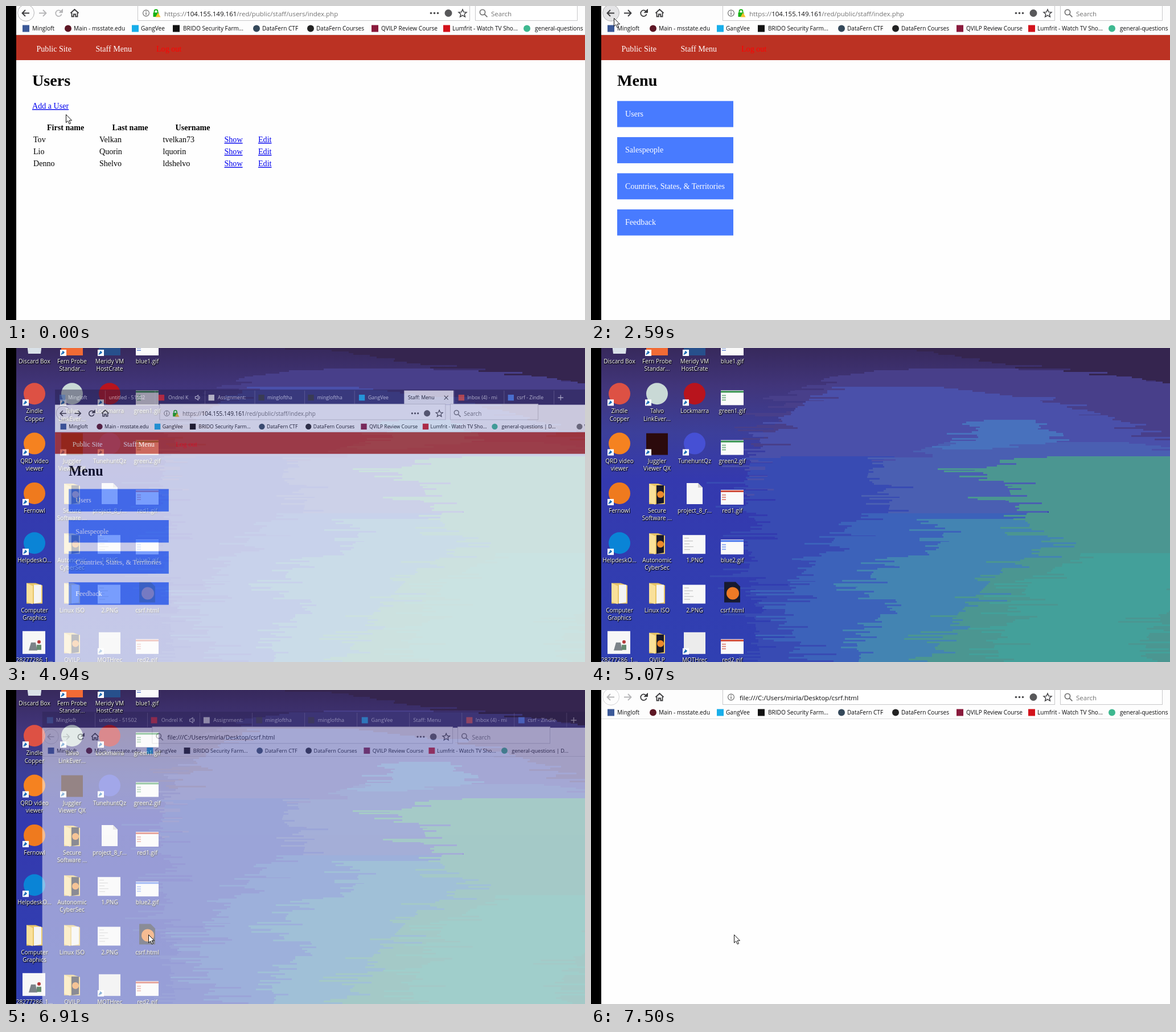
An HTML page that plays this animation: 1017x551 px, repeating every 8 s.

```html
<!DOCTYPE html>
<html lang="en">
<head>
<meta charset="utf-8">
<title>Desktop session</title>
<style>
  html, body { margin: 0; width: 100%; height: 100%; overflow: hidden; background: #000; }
  svg { display: block; width: 1017px; height: 551px; }
  text { white-space: pre; }
  .ui { font: 10.1px "Open Sans", "Noto Sans", sans-serif; }
  .field { font: 11.5px "Open Sans", "Noto Sans", sans-serif; }
  .page { font: 14.08px "Liberation Serif", "Times New Roman", serif; }
  .title { font: bold 28.16px "Liberation Serif", "Times New Roman", serif; }
  .bold { font-weight: bold; }
  .link { fill: #00e; text-decoration: underline; }
  .label { fill: #fff; text-anchor: middle; text-shadow: 0 1px 2px #000, 1px 1px 1px #000; }
  .line { fill: none; stroke: #3c3c3e; stroke-width: 1.8; }
</style>
</head>
<body>
<svg id="stage" viewBox="0 0 1017 551"></svg>
<script>
const LOOP = 8000;
const range = n => [...Array(n).keys()];
const rect = (x, y, w, h, fill, more = '') =>
  `<rect x="${x}" y="${y}" width="${w}" height="${h}" fill="${fill}" ${more}/>`;
const circle = (x, y, r, fill, more = '') =>
  `<circle cx="${x}" cy="${y}" r="${r}" fill="${fill}" ${more}/>`;
const shape = (d, fill, more = '') => `<path d="${d}" fill="${fill}" ${more}/>`;
const line = (d, more = '') => `<path class="line" d="${d}" ${more}/>`;
const text = (x, y, str, cls, fill = '#0c0c0d') =>
  `<text x="${x}" y="${y}" class="${cls}" fill="${fill}">${str}</text>`;
const group = (id, body) => `<g id="${id}">${body}</g>`;

// ---------- wallpaper ----------
let seed = 7;
const random = () => (seed = (seed * 16807) % 2147483647) / 2147483647;

// Streaky patch; rows are [y, left, right], joined linearly with jagged ends.
function streaks(fill, rows, jag = 70) {
  let d = '';
  const jitter = () => (random() * 2 - 1) ** 3 * jag;
  for (let i = 0; i + 1 < rows.length; i++) {
    const [y0, l0, r0] = rows[i], [y1, l1, r1] = rows[i + 1];
    for (let y = y0; y < y1; y += 3) {
      const k = (y - y0) / (y1 - y0);
      const left = Math.round(l0 + (l1 - l0) * k + jitter());
      const right = Math.round(r0 + (r1 - r0) * k + jitter());
      if (right > left) d += `M${left} ${y}H${right}v3H${left}z`;
    }
  }
  return shape(d, fill);
}

const wallpaper = () => `
  <linearGradient id="sky" x2="0" y2="1">
    <stop offset="0" stop-color="#37295c"/><stop offset=".12" stop-color="#41357a"/>
    <stop offset=".27" stop-color="#3c3f9a"/><stop offset=".42" stop-color="#3439ae"/>
    <stop offset="1" stop-color="#3040b2"/>
  </linearGradient>` +
  rect(0, 0, 1017, 551, 'url(#sky)') +
  streaks('#35254f', [[0, 560, 1100], [24, 700, 1100], [48, 900, 1100], [70, 1010, 1100]]) +
  streaks('#483f8a', [[36, 520, 800], [50, 420, 950], [75, 350, 1100], [140, 320, 1100], [190, 310, 1100]]) +
  streaks('#4a50aa', [[68, 430, 620], [90, 380, 800], [115, 345, 900], [150, 315, 990], [200, 280, 1100], [260, 270, 1100]], 50) +
  streaks('#384bb3', [[190, 280, 520], [250, 270, 600], [330, 275, 700], [430, 280, 650], [551, 300, 600]]) +
  streaks('#4a5fb2', [[165, 620, 960], [195, 510, 1100], [225, 480, 1100], [260, 530, 900], [292, 520, 760]]) +
  streaks('#4871bd', [[126, 690, 780], [140, 680, 800], [160, 640, 840], [176, 610, 720]], 40) +
  streaks('#3c62ba', [[290, 480, 1100], [330, 430, 1100], [370, 400, 1100], [410, 350, 1100], [470, 340, 1100], [551, 380, 1100]]) +
  streaks('#4384b2', [[300, 590, 1100], [340, 630, 1100], [380, 510, 1100], [420, 465, 1100], [455, 530, 1100], [500, 465, 1100], [551, 470, 1100]], 50) +
  streaks('#4b9691', [[190, 770, 1100], [212, 675, 1100], [240, 740, 1100], [265, 730, 1100], [290, 760, 1100], [350, 790, 1100], [400, 710, 1100], [470, 640, 1100], [551, 590, 1100]]) +
  streaks('#43a09a', [[360, 860, 1100], [410, 770, 1100], [470, 740, 1000], [551, 690, 960]]);

// ---------- desktop ----------
const colX = [50, 116, 182, 248];
const badge = (x, y) => rect(x - 21, y + 10, 11, 11, '#fff') +
  line(`M${x - 18.5} ${y + 19}q0-4 4-4.5m-2.5-2l3 2.2l-2.5 2.8`, 'style="stroke:#1769b5;stroke-width:1.6"');
const paper = (x, y) => shape(`M${x - 14} ${y - 18}h20l8 8v29h-28z`, '#f6f6f6') +
  shape(`M${x + 6} ${y - 18}v8h8z`, '#cfcfcf');

const icons = {
  dot: (x, y, fill) => circle(x, y, 19, fill),
  box: (x, y, fill) => rect(x - 19, y - 18, 38, 38, fill),
  bin: (x, y) => shape(`M${x - 15} ${y - 16}h30l-4 33h-22z`, '#d9e1e8'),
  folder: (x, y, fill) => shape(`M${x - 14} ${y - 17}h16l12 4v32h-28z`, '#e8c566') +
    shape(`M${x - 1} ${y - 14}h13v31l-13 2z`, fill) +
    (fill === '#17182a' ? circle(x + 6, y + 2, 6, '#ee8a2c') : '') +
    shape(`M${x - 14} ${y - 17}l11 5v32l-11-4z`, '#f9e09a'),
  page: paper,
  shot: (x, y) => rect(x - 21, y - 14, 40, 33, '#f8f8f8') +
    range(5).map(i => rect(x - 18, y - 9 + i * 5, 8 + i * 7 % 13, 1, '#bbb')).join(''),
  thumb: (x, y, fill) => rect(x - 20, y - 6, 40, 26, '#fafafa') +
    rect(x - 20, y - 5, 40, 3, fill) +
    range(3).map(i => rect(x - 18, y + 2 + i * 4, 7, 2, fill, 'opacity=".6"')).join(''),
  html: (x, y) => shape(`M${x - 14} ${y - 19}h20l8 8v28h-28z`, '#171a30') + circle(x + 1, y + 1, 11, '#ee7a26'),
  photo: (x, y) => rect(x - 21, y - 20, 40, 40, '#f7f7f7') +
    shape(`M${x - 10} ${y + 14}l4-14h8l3 14z`, '#7c8389') +
    circle(x + 8, y - 1, 3, '#b53a3a') + rect(x + 4, y + 4, 8, 9, '#658a70'),
};

// [kind, colour, shortcut, label, second line], row by row
const items = [
  ['bin', '', 0, 'Discard Box'], ['box', '#f26b35', 1, 'Fern Probe', 'Standar...'],
  ['box', '#27508c', 1, 'Meridy VM', 'HostCrate'], ['thumb', '#3c67c8', 0, 'blue1.gif'],
  ['dot', '#dd5144', 1, 'Zindle', 'Copper'], ['dot', '#c9d9d6', 1, 'Talvo', 'LinkEver...'],
  ['dot', '#b8141d', 1, 'Lockmarra'], ['thumb', '#35924e', 0, 'green1.gif'],
  ['dot', '#f58220', 1, 'QRD video', 'viewer'], ['box', '#2b0a0c', 1, 'Juggler', 'Viewer QX'],
  ['dot', '#4650d4', 1, 'TunehuntQz'], ['thumb', '#35924e', 0, 'green2.gif'],
  ['dot', '#ef7a1e', 1, 'Fernowl'], ['folder', '#17182a', 0, 'Secure', 'Software ...'],
  ['page', '', 0, 'project_8_r...'], ['thumb', '#cf4a38', 0, 'red1.gif'],
  ['dot', '#0a84d6', 1, 'HelpdeskO...'], ['folder', '#17182a', 0, 'Autonomic', 'CyberSec'],
  ['shot', '', 0, '1.PNG'], ['thumb', '#4a78ee', 0, 'blue2.gif'],
  ['folder', '#f4f4f4', 0, 'Computer', 'Graphics'], ['folder', '#f4f4f4', 0, 'Linux ISO'],
  ['shot', '', 0, '2.PNG'], ['html', '', 0, 'csrf.html'],
  ['photo', '', 0, '28277286_1...'], ['folder', '#17182a', 0, 'QVILP'],
  ['box', '#ececec', 1, 'MOTHrec'], ['thumb', '#cf4a38', 0, 'red2.gif'],
];

const desktop = () => wallpaper() +
  rect(217.5, 407.5, 62, 59, '#7fb5ff', 'id="hover" fill-opacity=".35" stroke="#8fc0f0" stroke-opacity=".7"') +
  items.map(([kind, fill, shortcut, label, second], i) => {
    const x = colX[i % 4], y = -7 + 87.3 * Math.floor(i / 4);
    return icons[kind](x, y, fill) + (shortcut ? badge(x, y) : '') +
      text(x, y + 34, label, 'ui label', '#fff') +
      (second ? text(x, y + 47.2, second, 'ui label', '#fff') : '');
  }).join('');

// ---------- browser ----------
// [icon centre, text x, label, icon colour, square icon]
const bookmarks = [
  [35, 46, 'Mingloft', '#3b5998', 1], [109, 119, 'Main - msstate.edu', '#5d1725', 0],
  [227, 237, 'GangVee', '#18aeea', 1], [299, 311, 'BRIDO Security Farm...', '#111', 1],
  [440, 450, 'DataFern CTF', '#34485a', 0], [535, 545, 'DataFern Courses', '#222', 0],
  [648, 659, 'QVILP Review Course', '#8a1a3c', 1], [774, 784, 'Lumfrit - Watch TV Sho...', '#d3121b', 1],
  [915, 929, 'general-questions | D...', '#3eb890', 0], [1088, 1098, 'Week 8', '#777', 0],
];
const tabs = [
  [33, 44.6, 'Mingloft', '#3b5998'], [0, 128, 'untitled - 51502'],
  [235, 249, 'Ondrel K', '#d8252b'], [337, 350, 'Assignment:', '#ddd'],
  [439, 451, 'mingloftha', '#333'], [540, 553, 'mingloftha', '#333'],
  [644, 656.6, 'GangVee', '#18aeea'], [0, 738, 'Staff: Menu'],
  [847, 859, 'Inbox (4) - mi', '#d64a3d'], [948, 960, 'csrf - Zindle', '#4a80e8'],
];
const mark = (x, y, fill, square) => square ? rect(x - 6, y - 6, 12, 12, fill) : circle(x, y, 6, fill);
const magnifier = x => `<circle class="line" cx="${x}" cy="11" r="4.6" style="stroke:#777"/>` +
  line(`M${x + 3.4} 14.4l5 5`, 'style="stroke:#777"');
const arrow = (x, dir) => `M${x + dir * 6} 12.5H${x - dir * 6}M${x + dir} 7l${dir * 5.5} 5.5l${-dir * 5.5} 5.5`;

const tabStrip = () =>
  rect(18, -36, 1200, 31, '#241d45', 'fill-opacity=".6"') +
  rect(730, -34, 101, 29, '#f4f4f6', 'id="activeTab"') +
  range(10).map(i => rect(120 + 101.7 * i, -34, 1, 28, '#8a84a8', 'opacity=".6"')).join('') +
  tabs.map(([ix, tx, label, fill]) => (fill ? mark(ix, -19.5, fill, 1) : '') +
    `<text x="${tx}" y="-16" class="ui" ${tx === 738 ? 'id="activeLabel"' : ''} fill="#dcdce8">${label}</text>`).join('') +
  line('M304-21.5h2l4-3v10l-4-3h-2zM312-22.5q2 3 0 6', 'style="stroke:#dcdce8;stroke-width:1.2"') +
  line('M812-23.5l8 8m0-8l-8 8', 'id="closeTab" style="stroke-width:1.2"') +
  line('M1044-19.5h11m-5.5-5.5v11', 'style="stroke:#dcdce8;stroke-width:1.3"');

const webUrl = (id, tail) => `<text id="${id}" x="278" y="17.5" class="field" fill="#737373">https://` +
  `<tspan fill="#0c0c0d">104.155.149.161</tspan>/red/public/staff/${tail}</text>`;

const toolbar = () =>
  rect(18, -5, 1200, 56, '#fdfdfd') + rect(18, 50, 1200, 1, '#dedede') +
  circle(35, 12, 14.5, '#fdfdfd', 'id="back" stroke="#b4b4b6"') +
  line(arrow(35, -1), 'id="backArrow"') + line(arrow(64, 1), 'id="forward"') +
  group('reload', line('M97.2 10.2a5.3 5.3 0 1 0 .4 4.2', 'style="stroke:inherit"') +
    shape('M99.5 5.5v6.2h-6.2z', 'currentColor')) +
  line('M113.5 12.5l7-6.5l7 6.5M115.5 12v6.5h3.3v-4h3.4v4h3.3v-6.5') +
  rect(231.5, -6.5, 583, 32, '#fff', 'stroke="#c8c8ca"') +
  rect(824.5, -6.5, 179, 32, '#fff', 'stroke="#c8c8ca"') +
  group('info', '<circle class="line" cx="246" cy="12.5" r="5.4" style="stroke:#666;stroke-width:1.1"/>' +
    rect(245.3, 11.5, 1.4, 4.2, '#666') + rect(245.3, 8.8, 1.4, 1.5, '#666')) +
  group('lookup', magnifier(244)) +
  group('lock', line('M260.5 12v-2.5a3 3 0 0 1 6 0v2.5', 'style="stroke:#14b114"') +
    rect(258.5, 11.5, 10, 7.5, '#14b114') + shape('M267 11.5l4.5 8h-9z', '#f2c02c')) +
  webUrl('usersUrl', 'users/index.php') + webUrl('menuUrl', 'index.php') +
  group('fileUrl', text(261, 17.5, 'file:///C:/Users/mirla/Desktop/csrf.html', 'field')) +
  [747, 753, 759].map(x => circle(x - .5, 12.5, 1.8, '#4a4a4c')).join('') +
  circle(777, 12.5, 6.5, '#58585a') +
  line('M802 6l2 4.6l5 .4l-3.8 3.2l1.2 4.8l-4.4-2.6l-4.4 2.6l1.2-4.8l-3.8-3.2l5-.4z', 'style="stroke-width:1.4"') +
  magnifier(837) + text(852, 17.5, 'Search', 'field', '#737373') +
  bookmarks.map(([ix, tx, label, fill, square]) => mark(ix, 39.5, fill, square) + text(tx, 43, label, 'ui')).join('');

const accounts = [
  ['Tov', 'Velkan', 'tvelkan73'], ['Lio', 'Quorin', 'lquorin'], ['Denno', 'Shelvo', 'ldshelvo'],
];
const usersPage = () => text(46, 140, 'Users', 'title', '#000') +
  text(46, 180, 'Add a User', 'page link') +
  text(72, 218, 'First name', 'page bold', '#000') +
  text(186.5, 218, 'Last name', 'page bold', '#000') +
  text(297.5, 218, 'Username', 'page bold', '#000') +
  accounts.map((account, i) => {
    const y = 239 + 21.2 * i;
    return account.map((value, j) => text([48, 164, 275.5][j], y, value, 'page', '#000')).join('') +
      text(383.5, y, 'Show', 'page link') + text(443, y, 'Edit', 'page link');
  }).join('');

const menuPage = () => text(46, 140, 'Menu', 'title', '#000') +
  ['Users', 'Salespeople', 'Countries, States, &amp; Territories', 'Feedback'].map((label, i) =>
    rect(46, 166.7 + 63.4 * i, 204, 45.8, '#487bff') + text(60, 194 + 63.4 * i, label, 'page', '#fff')).join('');

const navBar = () => rect(18, 51, 1200, 44, '#bb3223') +
  text(53.5, 80, 'Public Site', 'page', '#fff') +
  text(157.5, 80, 'Staff Menu', 'page', '#fff') +
  text(264, 80, 'Log out', 'page', '#f00');

const stage = document.getElementById('stage');
stage.innerHTML = desktop() +
  group('browser', tabStrip() + rect(18, 51, 1200, 700, '#fefefe') + toolbar() +
    group('nav', navBar()) + group('users', usersPage()) + group('menu', menuPage())) +
  rect(0, 0, 18, 551, '#000') +
  shape('M.5.5v14.2l3.3-3.1l2.4 5.4l2.3-1l-2.4-5.2h4.4z', '#fff', 'id="cursor" stroke="#111" stroke-width="1"');

// ---------- timeline ----------
// [from ms, x, y]; without a position the pointer is hidden
const pointer = [
  [0, 105, 190], [270, 115, 193], [430, 154, 196], [570, 156, 196], [990, 139, 178],
  [1130, 88, 134], [1260, 50, 97], [1400, 45, 68], [1520, 43, 54], [1640, 41, 34],
  [1760, 40, 24], [1880, 39, 21], [2030, 40, 21], [2730, 44, 21], [2850, 42, 21],
  [3000, 83, 56], [3150, 150, 160], [3270, 270, 350], [3400, 357, 490], [3550, 381, 525],
  [3690], [5210, 327, 491], [5490, 315, 480], [5620, 302, 467], [5770, 261, 446],
  [5930, 250, 430], [6070, 250, 429], [7060], [7500, 251, 429],
];
// [from ms, opacity, scale, x, y]
const windowPoses = [
  [0, 1, 1, 0, 0], [4940, .72, .861, 70.6, 103.9], [5070, 0, 1, 0, 0],
  [6910, .5, .905, 47.4, 70.7], [7060, 1, 1, 0, 0],
];

const el = id => document.getElementById(id);
const show = (id, on) => el(id).setAttribute('display', on ? 'inline' : 'none');
const at = (steps, t) => steps.filter(step => step[0] <= t).pop();
const tone = on => on ? '#3c3c3e' : '#b6b6b8';

function render(t) {
  const local = t >= 6000, menu = t >= 2340 && !local, users = t < 2340;
  const opening = local && t < 7060;

  const [, opacity, scale, x, y] = at(windowPoses, t);
  el('browser').setAttribute('opacity', opacity);
  el('browser').setAttribute('transform', `translate(${x} ${y}) scale(${scale})`);
  show('browser', opacity > 0);

  show('users', users);
  show('menu', menu);
  show('nav', !local);
  show('usersUrl', users);
  show('menuUrl', menu);
  show('fileUrl', local);
  show('lock', !local);
  show('info', !opening);
  show('lookup', opening);
  show('activeTab', !local);
  show('closeTab', !local);
  el('activeLabel').setAttribute('fill', local ? '#dcdce8' : '#0c0c0d');

  el('back').setAttribute('fill', t >= 1640 && t < 3150 ? '#e4e4e6' : '#fdfdfd');
  el('back').setAttribute('stroke', local ? '#d4d4d6' : '#b4b4b6');
  el('backArrow').style.stroke = tone(!local);
  el('forward').style.stroke = tone(menu);
  el('reload').style.color = el('reload').style.stroke = tone(t >= 270);
  show('hover', t >= 5770 && t < 6910);

  const [, px, py] = at(pointer, t);
  show('cursor', px !== undefined);
  if (px !== undefined) el('cursor').setAttribute('transform', `translate(${px} ${py})`);
}

const start = performance.now();
function tick() {
  render((performance.now() - start) % LOOP);
  requestAnimationFrame(tick);
}
tick();
</script>
</body>
</html>
```
